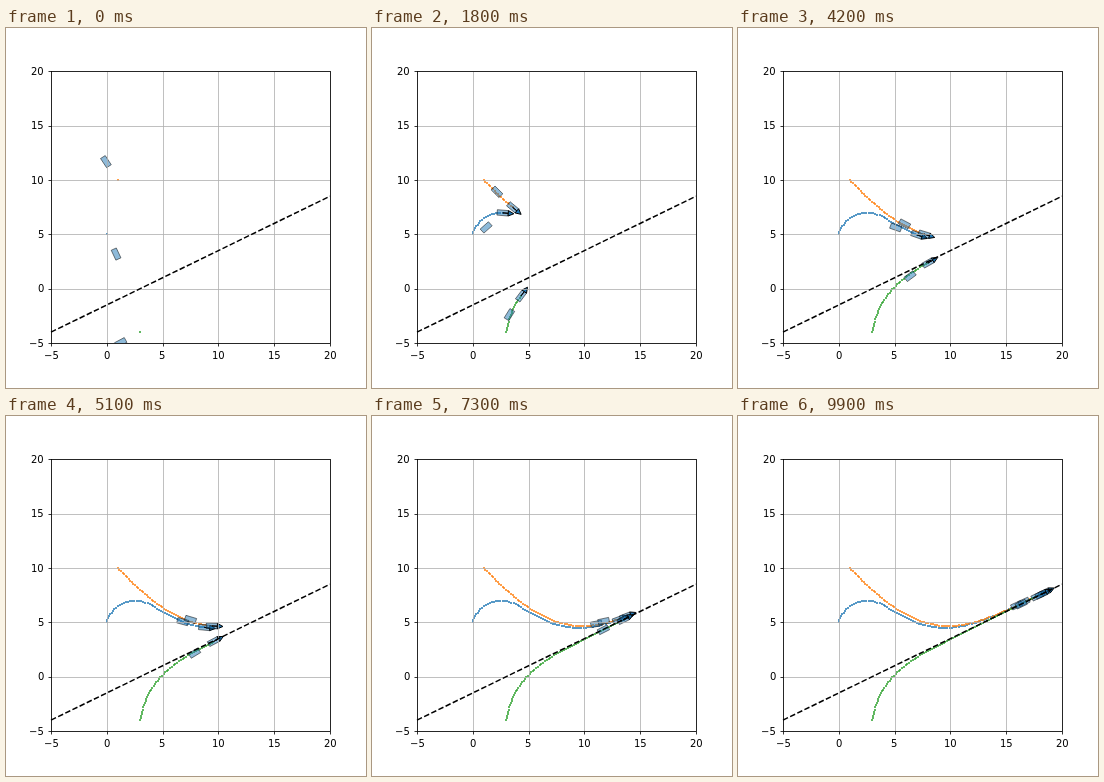
An HTML page with a canvas for the animation above (10000 ms loop, 360 by 360 pixels).

```html
<!DOCTYPE html>
<html>
<head>
<meta charset="utf-8">
<title>Trailers converging on a line</title>
<style>
html, body { margin: 0; width: 100%; height: 100%; overflow: hidden; background: #fff; }
canvas { display: block; }
</style>
</head>
<body>
<canvas id="stage" width="360" height="360"></canvas>
<script>
const ctx = document.getElementById('stage').getContext('2d');
const LEFT = 45, RIGHT = 324, TOP = 43.2, BOTTOM = 315;
const UX = (RIGHT - LEFT) / 25, UY = (BOTTOM - TOP) / 25;
const STEPS = 100, DT = 0.1, SPEED = 2, HITCH = 2;
const SLOPE = 0.5, OFFSET = -1.5;
const LOOKAHEAD = 3, GAIN = 3, MAX_TURN = 0.76;

const toPx = ([x, y]) => [LEFT + (x + 5) * UX, BOTTOM - (y + 5) * UY];
const snap = v => Math.round(v) + 0.5;
const lineY = x => SLOPE * x + OFFSET;

// Steers towards a point ahead on the line; the trailer is dragged behind.
function simulate(x, y, theta, phi) {
  const aim = Math.atan(SLOPE);
  const poses = [];
  for (let i = 0; i < STEPS; i++) {
    poses.push({
      pos: [x, y], theta, phi,
      rear: [x - HITCH * Math.cos(phi), y - HITCH * Math.sin(phi)]
    });
    const dist = (y - lineY(x)) * Math.cos(aim);
    const error = aim - Math.atan(dist / LOOKAHEAD) - theta;
    x += SPEED * DT * Math.cos(theta);
    y += SPEED * DT * Math.sin(theta);
    phi += SPEED * DT / HITCH * Math.sin(theta - phi);
    theta += DT * MAX_TURN * Math.tanh(GAIN * error / MAX_TURN);
  }
  return poses;
}

const vehicles = [
  { color: '#1f77b4', poses: simulate(0, 5, 1.28, 2) },
  { color: '#ff7f0e', poses: simulate(1, 10, -0.83, -1) },
  { color: '#2ca02c', poses: simulate(3, -4, 1.36, 0.5) }
];

// Paints a polygon given along and across a heading.
function polygon([x, y], angle, alpha, shape) {
  const c = Math.cos(angle), s = Math.sin(angle);
  ctx.beginPath();
  for (const [u, w] of shape) ctx.lineTo(...toPx([x + u * c - w * s, y + u * s + w * c]));
  ctx.closePath();
  ctx.globalAlpha = alpha;
  ctx.fillStyle = '#1f77b4';
  ctx.strokeStyle = '#000';
  ctx.lineWidth = 1;
  ctx.fill();
  ctx.stroke();
  ctx.globalAlpha = 1;
}

function box(pos, angle) {
  polygon(pos, angle, 0.5, [[-0.5, -0.25], [0.5, -0.25], [0.5, 0.25], [-0.5, 0.25]]);
}

function arrow(pos, angle) {
  polygon(pos, angle, 1, [[0, 0], [0.5, 0], [0.5, 0.25], [1, 0], [0.5, -0.25], [0.5, 0]]);
}

function line(x1, y1, x2, y2, color, width) {
  ctx.strokeStyle = color;
  ctx.lineWidth = width;
  ctx.beginPath();
  ctx.moveTo(x1, y1);
  ctx.lineTo(x2, y2);
  ctx.stroke();
}

function drawAxes() {
  const l = snap(LEFT), r = snap(RIGHT), t = snap(TOP), b = snap(BOTTOM);
  const ticks = [-5, 0, 5, 10, 15, 20];
  for (const v of ticks) {
    const [x, y] = toPx([v, v]).map(snap);
    line(x, t, x, b, '#b0b0b0', 0.8);
    line(l, y, r, y, '#b0b0b0', 0.8);
  }
  ctx.setLineDash([5.55, 2.4]);
  line(...toPx([-5, lineY(-5)]), ...toPx([20, lineY(20)]), '#000', 1.5);
  ctx.setLineDash([]);
  ctx.font = '10px "DejaVu Sans", sans-serif';
  ctx.fillStyle = '#000';
  for (const v of ticks) {
    const [x, y] = toPx([v, v]);
    line(snap(x), b, snap(x), b + 3, '#000', 0.8);
    line(l, snap(y), l - 3, snap(y), '#000', 0.8);
    const label = String(v).replace('-', '\u2212');
    const width = ctx.measureText(label).width;
    ctx.fillText(label, Math.round(x - width / 2), 331);
    ctx.fillText(label, Math.round(38 - width), Math.round(y + 3.8));
  }
  ctx.strokeStyle = '#000';
  ctx.lineWidth = 0.8;
  ctx.strokeRect(l, t, r - l, b - t);
}

function draw(now) {
  const step = Math.floor(now / 100) % STEPS;
  ctx.fillStyle = '#fff';
  ctx.fillRect(0, 0, 360, 360);
  ctx.save();
  ctx.beginPath();
  ctx.rect(LEFT, TOP, RIGHT - LEFT, BOTTOM - TOP);
  ctx.clip();
  for (const { color, poses } of vehicles) {
    ctx.fillStyle = color;
    for (const { pos } of poses.slice(0, step + 1)) {
      ctx.beginPath();
      ctx.arc(...toPx(pos).map(Math.round), 1, 0, 7);
      ctx.fill();
    }
  }
  for (const { poses } of vehicles) {
    const { pos, rear, theta, phi } = poses[step];
    box(rear, phi);
    if (step) {
      box(pos, theta);
      arrow(pos, theta);
    }
  }
  ctx.restore();
  drawAxes();
  requestAnimationFrame(draw);
}
requestAnimationFrame(draw);
</script>
</body>
</html>
```
